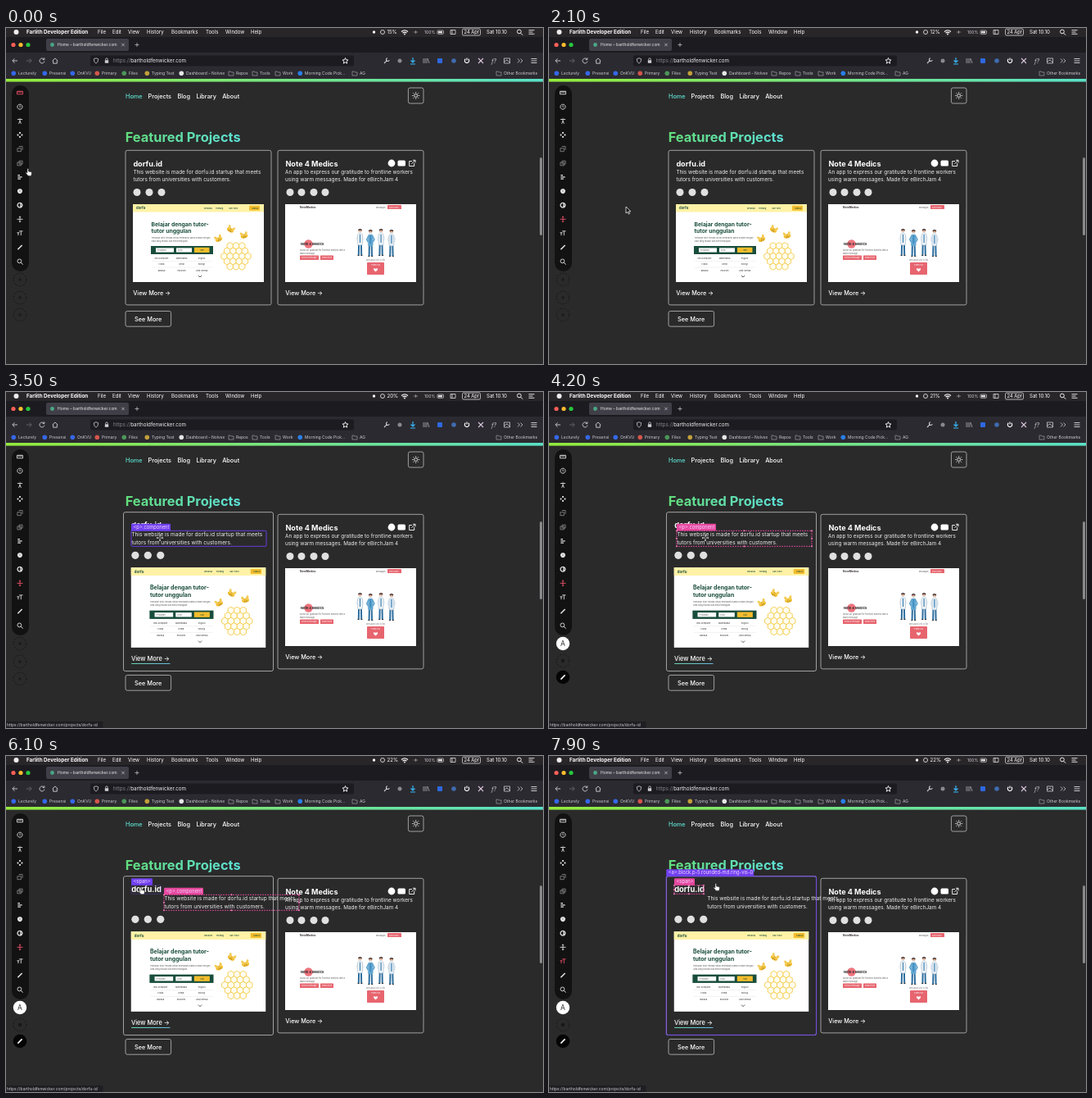
Write an HTML page that moves like this. It is 656x410 px and loops after 8 s.

```html
<!DOCTYPE html>
<html lang="en">
<head>
<meta charset="utf-8">
<title>Page inspector</title>
<style>
html, body { margin: 0; width: 100%; height: 100%; overflow: hidden; background: #2a2a2a; }
svg { display: block; font-family: Inter, "Noto Sans", sans-serif; }
</style>
</head>
<body>
<svg id="stage" width="656" height="410" viewBox="0 0 656 410" xmlns="http://www.w3.org/2000/svg"></svg>
<script>
const LOOP = 8000, PINK = '#e6489f', PURPLE = '#7040f0', GREY = '#9c9ba1', SOFT = '#cfced3';
const rect = (x, y, w, h, fill, more = '') => `<rect x="${x}" y="${y}" width="${w}" height="${h}" fill="${fill}" ${more}/>`;
const dot = (x, y, r, fill, more = '') => `<circle cx="${x}" cy="${y}" r="${r}" fill="${fill}" ${more}/>`;
const text = (x, y, size, str, fill = '#fff', more = '') => `<text x="${x}" y="${y}" font-size="${size}" fill="${fill}" ${more}>${str}</text>`;
const line = (d, stroke = '#fff', width = .9, more = '') => `<path d="${d}" fill="none" stroke="${stroke}" stroke-width="${width}" ${more}/>`;
const at = (x, y, body, more = '') => `<g transform="translate(${x} ${y})" ${more}>${body}</g>`;
const bold = 'font-weight="700"', medium = 'font-weight="500"';
const frame = (x, y, w, h, more = '') => rect(x, y, w, h, 'none', `rx="2.2" stroke="#bdbdbd" stroke-width=".8" ${more}`);
const lens = (c = '#fff') => line('M1.3 1.3L3.6 3.6', c, 1) + dot(-.6, -.6, 2.4, 'none', `stroke="${c}" stroke-width=".9"`);
const folder = (x) => at(x, 55, line('M0-2h2.2l.8 1h3v4H0z', GREY, .7));

function menuBar() {
  const items = [[112, 'File'], [130, 'Edit'], [149, 'View'], [172, 'History'], [202, 'Bookmarks'], [244, 'Tools'], [268, 'Window'], [299, 'Help']];
  return rect(0, 0, 656, 11, '#29262a') + dot(12.5, 5, 3, '#eee')
    + text(25, 7.3, 6.3, 'Farlith Developer Edition', '#fff', bold)
    + items.map(([x, s]) => text(x, 7.3, 6.1, s)).join('')
    + dot(449.5, 5, 1.7, '#fff') + dot(460, 5, 2.5, 'none', 'stroke="#ddd" stroke-width=".9"')
    + text(465.5, 7.3, 6.1, '', '#fff', 'id="load"')
    + at(487, 7.5, line('M-4-3Q0-6.5 4-3M-2.5-1.3Q0-3.5 2.5-1.3', '#fff', 1.1) + dot(0, 0, .9, '#fff'))
    + line('M498 5h5M500.5 3v4', GREY, .8) + text(511, 7.1, 5.1, '100%', SOFT)
    + rect(527, 3, 7.5, 4.3, 'none', 'rx="1" stroke="#ddd" stroke-width=".7"') + rect(528, 4, 5, 2.3, '#ddd')
    + at(546, 5, line('M-3 2.5v-5h6v5zM-1-2.5v5', '#ddd', .8))
    + rect(557.5, 1, 22, 8, 'none', 'rx="1.5" stroke="#d5d5d8" stroke-width=".8"') + text(559.5, 7.2, 5.8, '24 Apr')
    + text(587, 7.3, 6.1, 'Sat 10.10') + at(627.5, 5, lens())
    + at(642, 5, line('M-3.5-2.3h7M-3.5 0h5M-3.5 2.3h7', '#eee'));
}

function browser() {
  const lights = ['#ff5f57', '#febc2e', '#28c840'].map((c, i) => dot(9 + i * 9, 20.5, 2.6, c)).join('');
  const marks = [[15, 'Lecturely', '#3568e8'], [53, 'Presensi', '#3568e8'], [87, 'OnKVU', '#3568e8'], [117, 'Primary', '#d3564b'],
    [150, 'Files', '#4b9659'], [178, 'Typing Test', '#c2a03a'], [220, 'Dashboard – Nolvex', '#e6e6e6'], [365, 'Morning Code Pick…', '#2a7fe8']];
  const folders = [[281, 'Repos'], [310, 'Tools'], [338, 'Work'], [432, 'AG'], [608, 'Other Bookmarks']];
  const tools = at(465, 40, line('M-3 3L.6-.6M1-3.2a1.9 1.9 0 1 0 2.2 2.2', SOFT, 1.1))
    + at(481, 40, dot(0, 0, 2.5, '#8a898f'))
    + at(497, 40, line('M0-4v6M-2.5-.5L0 2 2.5-.5M-3 4h6', '#38b6f4', 1.2))
    + at(513, 40, line('M-3-3v6M-1-3v6M1-3v6M2-3l2 6', GREY))
    + rect(527, 37, 6, 6, '#2e68e0', 'rx="1"') + dot(547, 40, 2.8, '#3f6cb0')
    + at(563, 40, line('M-1.7-2.2a2.7 2.7 0 1 0 3.4 0M0-3.5v3', '#fff', 1.1))
    + at(580, 40, line('M-3-3L3 3M3-3L-3 3', '#d8c6dc', 1.1))
    + text(593, 42.5, 7, 'f?', SOFT, 'font-style="italic"')
    + at(612, 40, line('M-3.5-3h7v6h-7zM-3.5 1L0-1 3.5 2', SOFT, .8))
    + at(628, 40, line('M-3-2.5L-.5 0-3 2.5M.5-2.5L3 0 .5 2.5', SOFT, .8))
    + at(645, 40, line('M-3.5-2.5h7M-3.5 0h7M-3.5 2.5h7', '#eee', .8));
  return rect(0, 11, 656, 19, '#1c1b20') + lights
    + rect(49, 13, 101, 15, '#403f48', 'rx="2"') + dot(56.5, 20.5, 2.4, '#4aa884')
    + text(63, 22.4, 4.95, 'Home – bartholdfenwicker.com', '#eee')
    + at(143, 20.5, line('M-1.7-1.7L1.7 1.7M1.7-1.7L-1.7 1.7', SOFT, .7))
    + at(160, 20.5, line('M-2.5 0h5M0-2.5v5', SOFT, .7))
    + rect(0, 30, 656, 32, '#2b2a30')
    + at(11, 40, line('M3 0h-6M-.5-2.7L-3.2 0-.5 2.7', SOFT)) + at(28, 40, line('M-3 0h6M.5-2.7L3.2 0 .5 2.7', '#69686e'))
    + at(44, 40, line('M2.3-2A3 3 0 1 0 3 .6M2.9-3.6v2.2H.7', SOFT)) + at(60, 40, line('M-3.3 0L0-3 3.3 0M-2.3-.5v3.7h4.6V-.5', SOFT))
    + rect(103, 33.5, 322, 13, '#1c1b20', 'rx="2"')
    + at(110, 40, line('M0-3.3L2.7-2.2Q2.8 1.8 0 3.3Q-2.8 1.8-2.7-2.2z', SOFT, .8))
    + at(123, 40, rect(-2.2, -.7, 4.4, 3.5, SOFT, 'rx=".6"') + line('M-1.4-.7v-1a1.4 1.4 0 0 1 2.8 0v1', SOFT, .8))
    + text(131, 42.3, 6.25, '<tspan fill="#85848b">https://</tspan>bartholdfenwicker.com', '#eee')
    + at(414.5, 40, line('M0-3.5l1 2.3 2.5.2-1.9 1.7.6 2.5L0 1.9l-2.2 1.3.6-2.5L-3.5-1-1-1.2z'))
    + tools
    + marks.map(([x, s, c]) => dot(x - 5.7, 55.2, 2.8, c) + text(x, 57, 5, s, SOFT)).join('')
    + folders.map(([x, s]) => folder(x - 9) + text(x, 57, 5, s, SOFT)).join('')
    + rect(0, 62, 656, 3.6, 'url(#strip)');
}

function pageTop() {
  const rays = [...Array(8)].map((_, i) => line('M0-3v-1.5', '#fff', .8, `transform="rotate(${i * 45})"`)).join('');
  const links = [[173.6, 'Projects'], [209.4, 'Blog'], [232.4, 'Library'], [264.2, 'About']];
  return text(146, 85.5, 7.3, 'Home', '#5fdfd0', medium)
    + links.map(([x, s]) => text(x, 85.5, 7.3, s, '#fff', medium)).join('')
    + frame(491.4, 73, 18.6, 19) + at(500.7, 82.5, dot(0, 0, 1.9, 'none', 'stroke="#fff" stroke-width=".8"') + rays)
    + text(145.7, 138.6, 16.4, 'Featured Projects', 'url(#heading)', bold)
    + frame(146, 345.5, 55.6, 18.7) + text(157, 357.6, 7.3, 'See More', '#fff', medium)
    + rect(652, 158, 3, 95, '#8a8a8d', 'rx="1.5"');
}

function honeycomb(cx, cy, r) {
  const hex = [...Array(6)].map((_, i) => `${(r * Math.sin(i * Math.PI / 3)).toFixed(2)},${(r * Math.cos(i * Math.PI / 3)).toFixed(2)}`).join(' ');
  let out = '';
  for (let row = -2; row <= 2; row++) {
    const count = 5 - Math.abs(row);
    for (let i = 0; i < count; i++)
      out += at(cx + (i - (count - 1) / 2) * r * 1.732, cy + row * r * 1.5, `<polygon points="${hex}" fill="#fffdf0" stroke="#f3cc4c" stroke-width=".9"/>`);
  }
  return out;
}

function tutorShot() {
  const green = '#194d3b', yellow = '#f4bd2c';
  const wing = (x, tilt) => `<ellipse cx="${x}" cy="-3.4" rx="1.5" ry="3" fill="#f3cb55" transform="rotate(${tilt})"/>`;
  const bee = (x, y, a) => at(x, y, `<g transform="rotate(${a})"><ellipse rx="4.4" ry="2.5" fill="${yellow}"/>${line('M-1-2.3v4.6M1.3-2.3v4.6', '#8c7123', .6)}${wing(-1, -28) + wing(1.4, 24)}</g>`);
  const subjects = ['Ilmu Komputer', 'Matematika', 'English', 'Fisika', 'Kimia', 'Biologi', 'Bahasa', 'Ekonomi', 'Lihat Semua'];
  return rect(155, 215, 160, 95, '#fff') + rect(155, 215, 160, 9.5, '#fff2a6')
    + text(159, 221.3, 4.2, 'dorfu', green, bold)
    + [[242, 'Beranda'], [256, 'Tentang'], [272, 'Cari Tutor']].map(([x, s]) => text(x, 220.8, 2.4, s, green, medium)).join('')
    + rect(297, 216.7, 13, 6, yellow, 'rx="1"') + text(300.5, 220.7, 2.5, 'Masuk', green)
    + text(177.5, 241.5, 6.8, 'Belajar dengan tutor-', green, bold) + text(177.5, 250, 6.8, 'tutor unggulan', green, bold)
    + text(177.5, 257, 2.5, 'Temukan tutor terbaik untuk membantu kamu belajar dengan', '#555') + text(177.5, 261, 2.5, 'cara yang mudah dan menyenangkan', '#555')
    + rect(177, 266, 76, 10, green) + rect(183, 268.4, 22, 5.2, '#fff') + rect(208, 268.4, 19, 5.2, '#fff') + rect(230, 267.8, 18.5, 6.2, yellow)
    + text(185, 272, 2.5, 'Pelajaran', '#666') + text(210, 272, 2.5, 'Kota', '#666') + text(237, 272, 2.5, 'Cari', green)
    + subjects.map((s, i) => text(190 + i % 3 * 24.5, 281.7 + Math.floor(i / 3) * 7.5, 2.5, s, '#333', 'text-anchor="middle"')).join('')
    + line('M178 284.5h74M178 292h74', '#ddd', .4) + line('M235 302l2 2 2-2', '#333', .8)
    + honeycomb(281, 278.5, 4.2) + bee(260, 258, -25) + bee(274, 246.5, 30) + bee(291, 254, -12);
}

function medicsShot() {
  const red = '#e7656f';
  const coats = ['#eef2f6', '#5da7d4', '#eef2f6', '#e2ebf3'];
  const medic = (coat, i) => at(432.5 + i * 12.8, 245 + i % 2, line('M-1.4 18L-1.7 32M1.4 18L1.7 32', '#2f6f9f', 2)
    + line('M-2.6 8L-4.6 12-3 15M2.6 8L4.6 12 3 15', coat, 1.6)
    + rect(-3, 6, 6, 14, coat, 'rx="1.6" stroke="#7f9fb7" stroke-width=".4"') + line('M0 7v10', '#3d82b2', 1.2)
    + dot(0, 2.8, 2.1, '#d99a78') + line('M-1.9 2A2 2 0 0 1 1.9 2', '#362a32', 1.4) + rect(-1.5, 3.3, 3, 1.4, '#d6edf7')
    + line('M-3 32.5h2.2M.8 32.5h2.2', '#333', 1));
  return rect(341, 215, 160, 95, '#fff')
    + text(359, 220, 3.3, 'NoteMedics', '#3b3438', bold) + text(452, 219.6, 2.4, 'Messages', '#555')
    + rect(466, 216, 17, 5, red, 'rx=".6"') + text(468, 219.5, 2.3, 'Send Note', '#fff')
    + dot(369.5, 263.5, 5.2, '#ed747d') + text(360, 265.3, 4, 'Note 4 Medics', '#222', bold)
    + text(359, 272.2, 2.5, 'Show our gratitude for frontline workers with a', '#555') + text(359, 275.5, 2.5, 'warm message', '#555')
    + rect(359, 277.5, 23, 5.5, red, 'rx=".6"') + rect(384, 277.5, 16, 5.5, red, 'rx=".6"')
    + text(361, 281.1, 2.4, 'Send a message', '#fff') + text(386, 281.1, 2.4, 'Read more', '#fff')
    + coats.map(medic).join('') + text(451.5, 284, 2.3, 'Messages sent so far', '#777', 'text-anchor="middle"')
    + rect(441, 286, 21, 15, red, 'rx=".8"') + text(451.5, 289.5, 2.3, 'Thank you', '#fff', 'text-anchor="middle"')
    + `<path d="M451.5 297.5l-2.7-2.8q0-2.3 2.7-.9 2.7-1.4 2.7.9z" fill="#fff"/>`;
}

function card(x, title, icons, shot) {
  return frame(x, 149.3, 178, 188.6) + text(x + 9.4, 168.5, 9.1, title, '#fff', bold)
    + icons.map((dx) => dot(x + dx, 200.5, 4.5, '#e0e0e0')).join('')
    + shot + text(x + 9.2, 326.1, 7.25, 'View More →', '#fff', medium);
}

const para = (x, a, b) => text(x, 178.3, 6.4, a, '#ececec') + text(x, 187.3, 6.4, b, '#ececec');

const toolIcons = [
  'M-4-2h8v4h-8zM-2-2V0M0-2V0M2-2V0',
  'M0-3.5a3.5 3.5 0 1 1-.1 0M0-2V.2L1 1.2',
  'M0-4v1M-3.5-2h7M0-2V0L-1.6 4M0 0L1.6 4',
  'M0-3.8v2M0 1.8v2M-3.8 0h2M1.8 0h2',
  'M-3.5-1h5v4.5h-5zM-1.5-3.5h5v5',
  'M-3.5-1h5v4.5h-5zM-1-3h4.5v4.5H-1z',
  'M-3-2.5h3M-3 0h6M-3 2.5h4',
  'M0-2a2 2 0 1 1-.1 0',
  'M0-3.3a3.3 3.3 0 1 1-.1 0M1-2.5v5',
  'M-4 0h8M0-4v8M-1.3-2.7L0-4l1.3 1.3M-1.3 2.7L0 4l1.3-1.3',
  'M-1-3h5M1.5-3v6M-4-.8h3.4M-2.3-.8V3',
  'M-3 3L3-3',
];

function toolbar() {
  const widths = { 3: 2.3, 6: 1.5, 7: 3, 8: 1.5, 11: 1.8 };
  const icon = (d, i) => at(17, 79 + i * 17.15, `<g transform="scale(.88)">${line(d, 'currentColor', widths[i] || 1)}</g>`,
    `id="tool${i}" color="${i === 4 || i === 5 ? '#858585' : '#e2e2e2'}"`);
  const ring = (y) => dot(17, y, 7.8, 'none', 'stroke="#181818" stroke-width="1" stroke-dasharray="2 1.6"');
  return rect(7, 70, 21, 227, '#121212', 'rx="10.5"') + toolIcons.map(icon).join('') + at(17, 285, lens('#e2e2e2'))
    + `<g id="idle">${[307, 329, 350].map((y) => ring(y) + dot(17, y, 1.8, '#1c1c1c')).join('')}</g>`
    + `<g id="swatches">${dot(17, 307, 8.2, '#fff') + text(17, 310, 8.4, 'A', '#333', 'text-anchor="middle"') + ring(328) + dot(17, 328, 2.2, '#181818')
      + dot(17, 348, 8.3, '#050505') + at(17, 348, line('M-2.6 2.6L2.6-2.6', '#fff', 1.5))}</g>`;
}

// Outline with a tag label sitting on its top-left corner.
function marker(id, x, y, w, h, labelWidth, tag, color, handles, strength = 1) {
  const grips = handles ? [0, .5, 1].map((u) => [0, .5, 1].map((v) => u === .5 && v === .5 ? '' : dot(x + w * u, y + h * v, .8, '#ffd5ef', `stroke="${color}" stroke-width=".5"`)).join('')).join('') : '';
  return `<g id="${id}">${rect(x, y, w, h, 'none', `stroke="${color}" stroke-width=".9" stroke-opacity="${strength}" ${handles ? 'stroke-dasharray="2 1"' : 'rx="1"'}`)}`
    + rect(x, y - 8.6, labelWidth, 8.6, color, 'rx="1"') + text(x + 2.5, y - 2.4, 5.8, tag, '#f3d7ff') + grips + '</g>';
}

const cursors = `<g id="cursor">
<path id="arrow" d="M0 0v8l2-1.7 1.3 2.8 1.3-.6-1.3-2.7h2.6z" fill="#111" stroke="#eee" stroke-width=".8"/>
<path id="hand" d="M-1-4q1-1 1.6.2V-1l3 .6q1 .4.8 1.8L3.8 4.4H0L-2.8 1q-.4-1.2.7-.9l1 .8z" fill="#fff" stroke="#222" stroke-width=".6"/>
<g id="move">${line('M-4 0h8M0-4v8', '#eee', 2) + line('M-3.5 0h7M0-3.5v7', '#111', 1)}</g></g>`;

const stops = (id, a, b) => `<linearGradient id="${id}"><stop stop-color="${a}"/><stop offset="1" stop-color="${b}"/></linearGradient>`;
const $ = (id) => document.getElementById(id);
$('stage').innerHTML = `<defs>${stops('strip', '#93ea3c', '#5ae0c6') + stops('heading', '#62dd7c', '#5ddfd6') + stops('under', '#6fe3c0', '#6cc8ee')}</defs>`
  + rect(0, 0, 656, 410, '#2a2a2a') + menuBar() + browser() + pageTop()
  + card(332, 'Note 4 Medics', [15, 29, 44, 58], medicsShot())
  + para(341, 'An app to express our gratitude to frontline workers', 'using warm messages. Made for eBirchJam 4')
  + dot(471, 165, 4.4, '#fff') + rect(478.5, 161.5, 9.5, 7, '#fff', 'rx="1.6"') + at(496, 165, line('M0-2.5h-3.3v6h6V0M1-3.7h3v3M3.8-3.5L-.5.8'))
  + `<g id="card">${card(146, 'dorfu.id', [14, 29, 44], tutorShot())}${rect(155.4, 328.6, 46, .9, 'url(#under)', 'id="underline"')}
    <g id="blurb">${para(155.4, 'This website is made for dorfu.id startup that meets', 'tutors from universities with customers.')}</g></g>`
  + marker('linkHover', 143.2, 146.8, 183.4, 193.6, 107, '&lt;a&gt;.block.p-5.rounded-md.ring-vis-0', PURPLE)
  + marker('spanHover', 153, 157.8, 36, 10.5, 26, '&lt;span&gt;', PURPLE, false, .35)
  + marker('blurbHover', 153, 169.3, 165, 19, 48, '&lt;p&gt;.component', PURPLE)
  + marker('blurbPick', 153, 169.3, 165, 19, 48, '&lt;p&gt;.component', PINK, true)
  + marker('spanPick', 153, 157.8, 36, 10.5, 25, '&lt;span&gt;', PINK, true)
  + toolbar()
  + `<g id="status">${rect(0, 402, 118.5, 8, '#1f1e22') + text(1, 407.9, 4.9, 'https://bartholdfenwicker.com/projects/dorfu-id', SOFT)}</g>` + cursors;

// time, x, y of the pointer
const path = [[0, 27, 176], [300, 27, 180], [1000, 18, 232], [1600, 18, 232], [2100, 94, 218], [2450, 96, 216], [2900, 189, 171], [3100, 190, 173],
  [3400, 188, 178], [3950, 188, 178], [4200, 191, 178], [4900, 228, 178], [5050, 228, 178], [5400, 90, 181], [5650, 92, 181], [6150, 167, 164], [6300, 167, 164],
  [6500, 80, 215], [7000, 17, 250], [7100, 17, 250], [7450, 170, 163], [7600, 170, 163], [7900, 204, 160], [LOOP, 204, 160]];
const load = [[0, 15], [1900, 12], [2600, 20], [4000, 21], [5000, 22]];

const ramp = (t, a, b) => { const u = Math.min(1, Math.max(0, (t - a) / (b - a))); return u * u * (3 - 2 * u); };
const show = (id, on) => $(id).setAttribute('visibility', on ? 'visible' : 'hidden');
const within = (t, a, b) => t >= a && t < b;

function pointerAt(t) {
  const i = path.findIndex((key, n) => n && t < key[0]);
  const [t0, x0, y0] = path[i - 1], [t1, x1, y1] = path[i], u = ramp(t, t0, t1);
  return [x0 + (x1 - x0) * u, y0 + (y1 - y0) * u];
}

function pointerKind(t) {
  if (within(t, 6450, 6850)) return 'none';
  if (within(t, 3400, 5100)) return 'move';
  return t < 1700 || within(t, 2650, 3400) || within(t, 6050, 6450) || t >= 6850 ? 'hand' : 'arrow';
}

function render(t) {
  const [x, y] = pointerAt(t), kind = pointerKind(t);
  const hover = ramp(t, 2620, 2820), scale = 1 + .028 * hover;
  const shift = 3 * ramp(t, 3950, 4200) + 37 * ramp(t, 4200, 4900);
  $('load').textContent = load.filter(([start]) => t >= start).pop()[1] + '%';
  $('card').setAttribute('transform', `translate(235 243.6) scale(${scale}) translate(-235 -243.6)`);
  $('underline').setAttribute('width', 46 * hover);
  $('blurb').setAttribute('transform', `translate(${shift / scale} 0)`);
  $('blurbPick').setAttribute('transform', `translate(${shift} 0)`);

  show('linkHover', within(t, 2650, 2780) || within(t, 5100, 6050) || t >= 7650);
  show('spanHover', within(t, 2780, 3150) || within(t, 6050, 7550));
  show('blurbHover', within(t, 3150, 3550));
  show('blurbPick', within(t, 3550, 7550));
  show('spanPick', t >= 7550);
  show('idle', t < 3550);
  show('swatches', t >= 3550);
  show('status', t >= 3150);

  const active = t < 1200 ? 0 : t < 7050 ? 9 : 10;
  for (const i of [0, 9, 10]) $('tool' + i).setAttribute('color', i === active ? '#f0526c' : '#e2e2e2');
  for (const name of ['arrow', 'hand', 'move']) show(name, name === kind);
  $('cursor').setAttribute('transform', `translate(${x} ${y})`);
}

const start = performance.now();
function tick(now) {
  render(Math.max(0, now - start) % LOOP);
  requestAnimationFrame(tick);
}
render(0);
requestAnimationFrame(tick);
</script>
</body>
</html>
```
